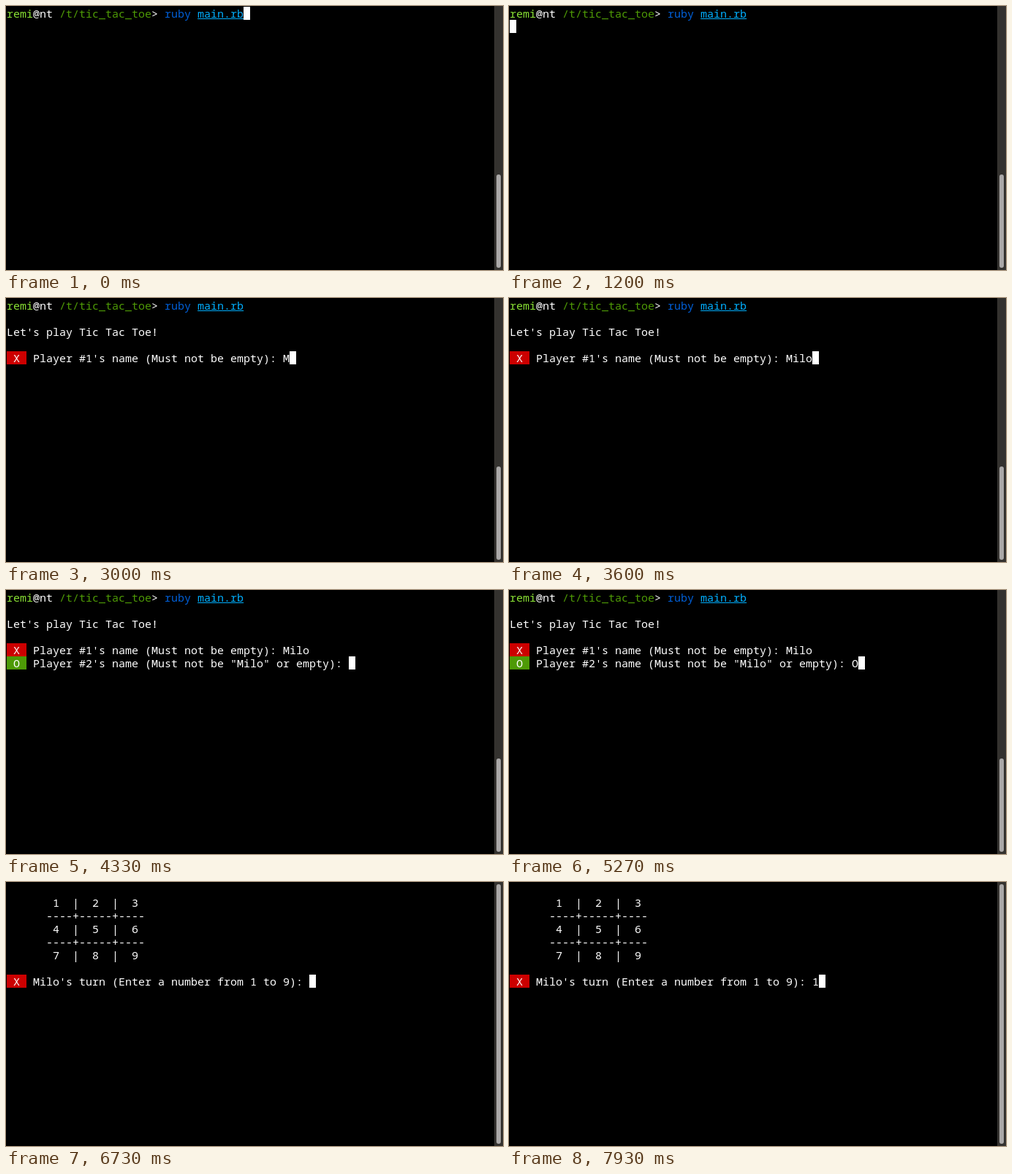
These frames come from a looping animation (680x362 px, 8 s). An HTML page:

```html
<!DOCTYPE html>
<html lang="en">
<head>
<meta charset="utf-8">
<style>
html, body { margin: 0; width: 100%; height: 100%; overflow: hidden; background: #000; }
pre { position: absolute; left: 1px; top: 1px; margin: 0; color: #fff;
  font: 15px/18px "Noto Sans Mono", "DejaVu Sans Mono", monospace; font-variant-ligatures: none; }
.badge { display: inline-block; height: 18px; }
.cursor { display: inline-block; width: 9px; height: 18px; background: #fff; vertical-align: top; }
u { color: #00afff; text-decoration: underline 1px; text-underline-offset: 1px; text-decoration-skip-ink: none; }
#track { position: absolute; left: 668px; top: 0; width: 12px; height: 362px; background: #34322f; }
#thumb { position: absolute; left: 3px; bottom: 3px; width: 6px; border-radius: 3px; background: #aaa8a8; }
</style>
</head>
<body>
<pre id="screen"></pre>
<div id="track"><div id="thumb"></div></div>
<script>
const LOOP = 8000;
const screenEl = document.getElementById('screen');
const thumb = document.getElementById('thumb');

const ink = (color, text) => `<span style="color:${color}">${text}</span>`;
const badge = (color, mark) => `<span class="badge" style="background:${color}"> ${mark} </span> `;
const cursor = '<span class="cursor"></span>';
const X = badge('#cc0000', 'X'), O = badge('#4e9a06', 'O');

const first = { name: 'Milo', keys: [3000, 3270, 3470, 3600] };
const second = { name: 'Oscar', keys: [5270, 5470, 5730, 6000, 6330] };
const typed = (p, t) => p.name.slice(0, p.keys.filter(k => t >= k).length);

const command = ink('#8ae234', 'remi') + '@nt ' + ink('#4e9a06', '/t/tic_tac_toe') +
  '> ' + ink('#005fd7', 'ruby') + ' <u>main.rb</u>';
const rule = '      ----+-----+----';
const cells = n => `       ${n}  |  ${n + 1}  |  ${n + 2}`;
const board = ['', cells(1), rule, cells(4), rule, cells(7), ''];

function content(t) {
  if (t >= 6730) {
    const turn = `${X}${first.name}'s turn (Enter a number from 1 to 9): `;
    return [...board, turn + (t >= 7930 ? '1' : '')];
  }
  const lines = [command];
  if (t >= 1200 && t < 1400) lines.push('');
  if (t >= 1400) {
    lines.push('', "Let's play Tic Tac Toe!", '',
      `${X}Player #1's name (Must not be empty): ${typed(first, t)}`);
  }
  if (t >= 4330) {
    lines.push(`${O}Player #2's name (Must not be "${first.name}" or empty): ${typed(second, t)}`);
  }
  if (t >= 6670) lines.push('');
  return lines;
}

let shown;
function draw(now) {
  const t = now % LOOP;
  const html = content(t).join('\n') + cursor;
  if (html !== shown) {
    screenEl.innerHTML = shown = html;
    thumb.style.height = (t >= 6730 ? 356 : 128) + 'px';
  }
  requestAnimationFrame(() => draw(performance.now() - start));
}
const start = performance.now();
draw(0);
</script>
</body>
</html>
```
